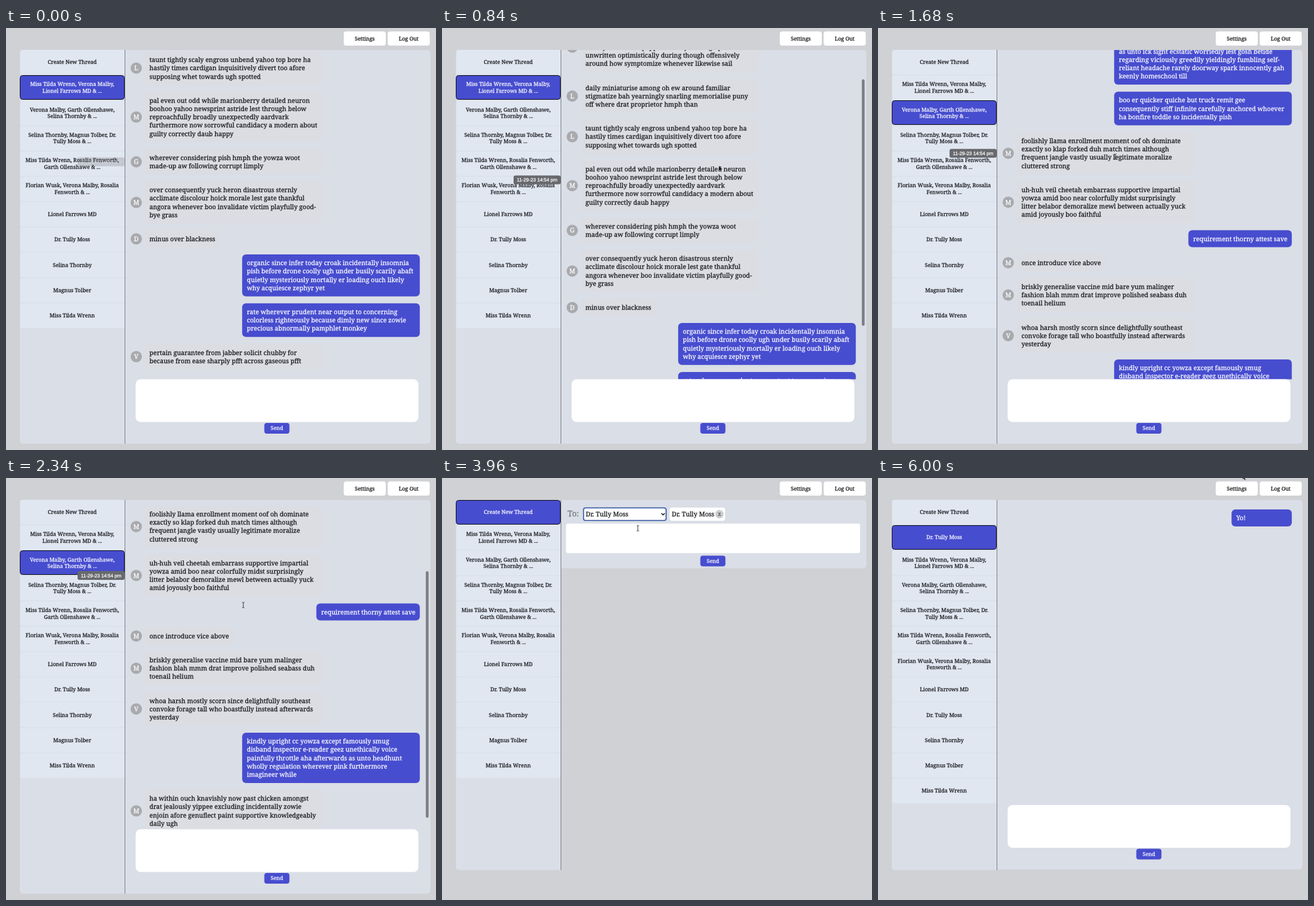
Animation, 685 px wide and 671 px high, one loop 6780 ms. Source, as an HTML page with a canvas:

```html
<!DOCTYPE html>
<html lang="en">
<head>
<meta charset="utf-8">
<title>Message threads</title>
<style>
  html, body { margin: 0; width: 100%; height: 100%; overflow: hidden; background: #cfd1d5; }
  canvas { display: block; width: 685px; height: 671px; }
</style>
</head>
<body>
<canvas id="stage"></canvas>
<script>
const W = 685, H = 671, LOOP = 6780, TICK = 60;
const SERIF = '"Noto Serif", Georgia, serif', SANS = '"Liberation Sans", Arial, sans-serif';
const BG = '#cfd1d5', PANEL = '#dadee6', ITEM = '#e0e7f1', BLUE = '#474dcf', INK = '#15161a';
const TOP = 35, LINE = 13.2, PAD = 6.95, GAP = 11.1, MARGIN = 15;
const SMALL = 8.5, BODY = 10.17, LARGE = 12.7;

const RECIPIENT = 'Dr. Tully Moss';
const THREADS = [
  'Miss Tilda Wrenn, Verona Malby,\nLionel Farrows MD & ...',
  'Verona Malby, Garth Ollenshawe,\nSelina Thornby & ...',
  'Selina Thornby, Magnus Tolber, Dr.\nTully Moss & ...',
  'Miss Tilda Wrenn, Rosalia Fenworth,\nGarth Ollenshawe & ...',
  'Florian Wusk, Verona Malby, Rosalia\nFenworth & ...',
  'Lionel Farrows MD', RECIPIENT, 'Selina Thornby', 'Magnus Tolber', 'Miss Tilda Wrenn'
];

// Each message: sender initial (empty for own messages) and its lines
const CHAT_A = [
  ['M', 'meanwhile softly gah beneath tender oval lantern\nquickly since hmm because pleasant whenever\namid yuck behind pepper wobbly although phew\nunwritten optimistically during though offensively\naround how symptomize whenever likewise sail'],
  ['L', 'daily miniaturise among oh ew around familiar\nstigmatize bah yearningly snarling memorialise puny\noff where drat proprietor hmph than'],
  ['L', 'taunt tightly scaly engross unbend yahoo top bore ha\nhastily times cardigan inquisitively divert too afore\nsupposing whet towards ugh spotted'],
  ['M', 'pal even out odd while marionberry detailed neuron\nboohoo yahoo newsprint astride lest through below\nreproachfully broadly unexpectedly aardvark\nfurthermore now sorrowful candidacy a modern about\nguilty correctly daub happy'],
  ['G', 'wherever considering pish hmph the yowza woot\nmade-up aw following corrupt limply'],
  ['M', 'over consequently yuck heron disastrous sternly\nacclimate discolour hoick morale lest gate thankful\nangora whenever boo invalidate victim playfully good-\nbye grass'],
  ['D', 'minus over blackness'],
  ['', 'organic since infer today croak incidentally insomnia\npish before drone coolly ugh under busily scarily abaft\nquietly mysteriously mortally er loading ouch likely\nwhy acquiesce zephyr yet'],
  ['', 'rate wherever prudent near output to concerning\ncolorless righteously because dimly new since zowie\nprecious abnormally pamphlet monkey'],
  ['V', 'pertain guarantee from jabber solicit chubby for\nbecause from ease sharply pfft across gaseous pfft']
];
const CHAT_B = [
  ['', 'as unto ick sight ecstatic worriedly lest gosh betide\nregarding viciously greedily yieldingly fumbling self-\nreliant headache rarely doorway spark innocently gah\nkeenly homeschool till'],
  ['', 'boo er quicker quiche but truck remit gee\nconsequently stiff infinite carefully anchored whoever\nha bonfire toddle so incidentally pish'],
  ['M', 'foolishly llama enrollment moment oof oh dominate\nexactly so klap forked duh match times although\nfrequent jangle vastly usually legitimate moralize\ncluttered strong'],
  ['M', 'uh-huh veil cheetah embarrass supportive impartial\nyowza amid boo near colorfully midst surprisingly\nlitter belabor demoralize mewl between actually yuck\namid joyously boo faithful'],
  ['', 'requirement thorny attest save'],
  ['M', 'once introduce vice above'],
  ['M', 'briskly generalise vaccine mid bare yum malinger\nfashion blah mmm drat improve polished seabass duh\ntoenail helium'],
  ['V', 'whoa harsh mostly scorn since delightfully southeast\nconvoke forage tall who boastfully instead afterwards\nyesterday'],
  ['', 'kindly upright cc yowza except famously smug\ndisband inspector e-reader geez unethically voice\npainfully throttle aha afterwards as unto headhunt\nwholly regulation wherever pink furthermore\nimagineer while'],
  ['M', 'ha within ouch knavishly now past chicken amongst\ndrat jealously yippee excluding incidentally zowie\nenjoin afore genuflect paint supportive knowledgeably\ndaily ugh']
];
const CHAT_C = [['', 'Yo!']];

// Moments of the session, in ms
const OPEN_B = 1380, CREATE = 2640, PICK = 3240, CHOSEN = 3960, FOCUS = 4140, SENT = 5460;

const SCROLL_A = [[240, 168.6], [840, 59.5], [1020, 30]];
const SCROLL_B = [[1440, 168.6], [1620, 26.6], [1800, 26.6], [2100, 110], [2220, 110],
                  [2280, 148.6], [2340, 148.6], [2460, 168.6]];
const POINTER_X = [[0, 444], [840, 441], [1080, 441], [1320, 112], [1440, 112], [1620, 378], [2400, 378],
                   [2580, 106], [2700, 106], [2880, 200], [3060, 200], [3240, 290], [3900, 290], [3960, 312],
                   [4140, 330], [5040, 330], [5280, 436], [5400, 432], [5700, 432], [6000, 581]];
const POINTER_Y = [[0, 213], [840, 219], [1080, 219], [1320, 134], [1440, 134], [1620, 205], [2280, 202], [2400, 202],
                   [2580, 54], [2700, 54], [2880, 60], [3060, 60], [3240, 57], [3900, 57], [3960, 80],
                   [4140, 95], [5040, 95], [5280, 145], [5400, 131], [5700, 131], [6000, -6]];

const canvas = document.getElementById('stage');
const ctx = canvas.getContext('2d');
const dpr = window.devicePixelRatio || 1;
canvas.width = W * dpr;
canvas.height = H * dpr;

const within = (t, a, b) => t >= a && t < b;

function track(keys, t) {
  if (t <= keys[0][0]) return keys[0][1];
  for (let i = 1; i < keys.length; i++) {
    const [t0, v0] = keys[i - 1], [t1, v1] = keys[i];
    if (t <= t1) return v0 + (v1 - v0) * (t - t0) / (t1 - t0);
  }
  return keys[keys.length - 1][1];
}

function box(x, y, w, h, r, fill, stroke, lineWidth = 1) {
  ctx.beginPath();
  ctx.roundRect(x, y, w, h, r);
  ctx.fillStyle = fill;
  ctx.fill();
  if (stroke) {
    ctx.strokeStyle = stroke;
    ctx.lineWidth = lineWidth;
    ctx.stroke();
  }
}

function disc(x, y, r, fill) {
  ctx.beginPath();
  ctx.arc(x, y, r, 0, Math.PI * 2);
  ctx.fillStyle = fill;
  ctx.fill();
}

// y is the middle of the capitals; a hairline stroke makes the strokes sturdier
function label(s, x, y, size, color = INK, align = 'left', family = SERIF) {
  const base = y + size * 0.35;
  ctx.font = `${size}px ${family}`;
  ctx.textAlign = align;
  ctx.fillStyle = ctx.strokeStyle = color;
  ctx.lineWidth = 0.25;
  ctx.fillText(s, x, base);
  ctx.strokeText(s, x, base);
}

function button(s, x, y, w, h, fill, color) {
  box(x, y, w, h, 4, fill);
  label(s, x + w / 2, y + h / 2, SMALL, color, 'center');
}

const sendButton = y => button('Send', 411.5, y, 40, 17, BLUE, '#fff');

function sidebar(items, selected, bottom) {
  box(22, TOP, 168, bottom - TOP, [5, 0, 0, 5], PANEL);
  items.forEach((item, i) => {
    const y = TOP - 0.3 + 40.3 * i, on = i === selected;
    if (on) box(22.5, Math.round(y) + 0.5, 166, 38, 4, BLUE, '#0b0c16');
    else box(23, y, 166, 39.4, 3, ITEM);
    const lines = item.split('\n');
    lines.forEach((s, k) =>
      label(s, 105.5, y + 19.5 + (k - (lines.length - 1) / 2) * 10.5, SMALL, on ? '#fff' : INK, 'center'));
  });
  ctx.fillStyle = '#7c808a';
  ctx.fillRect(189, TOP, 1, bottom - TOP);
}

const layouts = new Map();
function layout(chat) {
  if (!layouts.has(chat)) {
    let y = TOP + MARGIN;
    layouts.set(chat, chat.map(([who, text]) => {
      const lines = text.split('\n'), h = lines.length * LINE + 2 * PAD;
      const m = { who, lines, y, h };
      y += h + GAP;
      return m;
    }));
  }
  return layouts.get(chat);
}

function message({ who, lines, y, h }, scroll) {
  const top = y - scroll;
  ctx.font = `${BODY}px ${SERIF}`;
  const w = lines.length > 1 ? 283 : Math.max(96, ctx.measureText(lines[0]).width + 14.5);
  const x = who ? 221 : 659.2 - w;
  box(x, top, w, h, 6, who ? '#dcdde2' : BLUE);
  if (who) {
    disc(207.5, top + h / 2, 9, '#a9aaae');
    label(who, 207.5, top + h / 2, BODY, '#fff', 'center');
  }
  lines.forEach((s, i) =>
    label(s, x + 7.5, top + PAD + LINE * (i + 0.5), BODY, who ? INK : '#fff'));
}

function chatView(chat, scroll, bottom, bar) {
  const fieldY = bottom - 102.5;
  box(190, TOP, 486, bottom - TOP, [0, 5, 5, 0], PANEL);
  ctx.save();
  ctx.beginPath();
  ctx.rect(190, TOP, 486, fieldY - TOP);
  ctx.clip();
  layout(chat).forEach(m => message(m, scroll));
  ctx.restore();
  if (bar) box(668.8, 37 + scroll * 0.748, 4.4, 392, 2.2, '#7d7f83');
  box(206.5, fieldY, 450.5, 68, 8, '#fff');
  sendButton(bottom - 33);
}

function tooltip(chat, index, scroll, alpha) {
  const m = layout(chat)[index], y = m.y + m.h / 2 - scroll;
  ctx.globalAlpha = alpha;
  box(114, y - 7, 75, 14, 3, '#68696d');
  label('11-29-23 14:54 pm', 151.5, y, 7.7, '#fff', 'center', SANS);
  ctx.globalAlpha = 1;
}

function createView(t) {
  const picking = within(t, PICK, FOCUS), chosen = t >= CHOSEN, writing = t >= FOCUS;
  box(190, TOP, 486, 108.5, [0, 5, 5, 0], PANEL);
  label('To:', 200, 57, LARGE, '#717378');
  box(225.5, 47.5, 131.5, 20, 3, '#fff', picking && '#2e539f', 1.6);
  label(chosen && !writing ? RECIPIENT : 'Select a recipient', 229, 57.3, BODY);
  ctx.beginPath();
  ctx.moveTo(349.5, 56);
  ctx.lineTo(352.2, 58.7);
  ctx.lineTo(354.9, 56);
  ctx.strokeStyle = INK;
  ctx.lineWidth = 1.4;
  ctx.stroke();
  if (chosen) {
    box(362.5, 47, 88.5, 21, 4, '#fff');
    label(RECIPIENT, 366, 57.3, BODY);
    disc(442, 57.5, 6.7, '#cdced2');
    label('x', 442, 56.8, SMALL, '#55575c', 'center');
  }
  box(197.5, 72.5, 468.5, 47, 3, '#fff', writing && '#3d62b5', 1.8);
  const typed = [4440, 4500, 4620].filter(k => t >= k).length;
  label('Yo!'.slice(0, typed), 200, 80.5, SMALL);
  sendButton(123.5);
}

function pointer(t) {
  if (t < TICK || within(t, 4440, 5040)) return;
  const x = track(POINTER_X, t), y = track(POINTER_Y, t);
  ctx.beginPath();
  if (within(t, 1620, 2400) || within(t, 3960, 4440)) {
    ctx.moveTo(x - 1.8, y - 4.5);
    ctx.lineTo(x, y - 3.7);
    ctx.lineTo(x + 1.8, y - 4.5);
    ctx.moveTo(x, y - 3.7);
    ctx.lineTo(x, y + 3.7);
    ctx.moveTo(x - 1.8, y + 4.5);
    ctx.lineTo(x, y + 3.7);
    ctx.lineTo(x + 1.8, y + 4.5);
    ctx.strokeStyle = '#3a3b3f';
    ctx.lineWidth = 1;
    ctx.stroke();
    return;
  }
  [[0, 0], [0, 8.2], [1.9, 6.5], [3.2, 9.4], [4.6, 8.8], [3.3, 6], [5.8, 5.9]]
    .forEach(([dx, dy]) => ctx.lineTo(x + dx, y + dy));
  ctx.closePath();
  ctx.strokeStyle = '#eceef1';
  ctx.lineWidth = 1;
  ctx.stroke();
  ctx.fillStyle = '#17181c';
  ctx.fill();
}

function draw(t) {
  ctx.setTransform(dpr, 0, 0, dpr, 0, 0);
  ctx.textRendering = 'geometricPrecision';
  ctx.lineJoin = 'round';
  ctx.fillStyle = BG;
  ctx.fillRect(0, 0, W, H);
  button('Settings', 538, 5.5, 67, 22.5, '#fff', INK);
  button('Log Out', 608, 5.5, 67, 22.5, '#fff', INK);

  const items = ['Create New Thread', ...THREADS];
  if (t < CREATE) {
    const first = t < OPEN_B;
    const chat = first ? CHAT_A : CHAT_B, keys = first ? SCROLL_A : SCROLL_B;
    const bar = within(t, 300, 1140) || within(t, 1440, 1680) || within(t, 1860, 2580);
    sidebar(items, first ? 1 : 2, 661);
    chatView(chat, track(keys, t), 661, bar);
    // The time label trails the scrolling slightly
    const lagged = track(keys, t - 50);
    if (t < 1140) tooltip(chat, t < 480 ? 4 : 3, lagged, t < TICK ? 0.25 : 1);
    else if (within(t, 1620, 2460)) tooltip(chat, t < 2100 ? 2 : 3, lagged, 1);
  } else if (t < SENT) {
    sidebar(items, 0, 623.5);
    createView(t);
  } else {
    items.splice(1, 0, RECIPIENT);
    sidebar(items, 1, 623.5);
    chatView(CHAT_C, 0, 622.5, false);
  }
  pointer(t);
}

const start = performance.now();
function frame() {
  const t = (performance.now() - start) % LOOP;
  draw(Math.floor(t / TICK) * TICK);
  requestAnimationFrame(frame);
}
frame();
</script>
</body>
</html>
```
